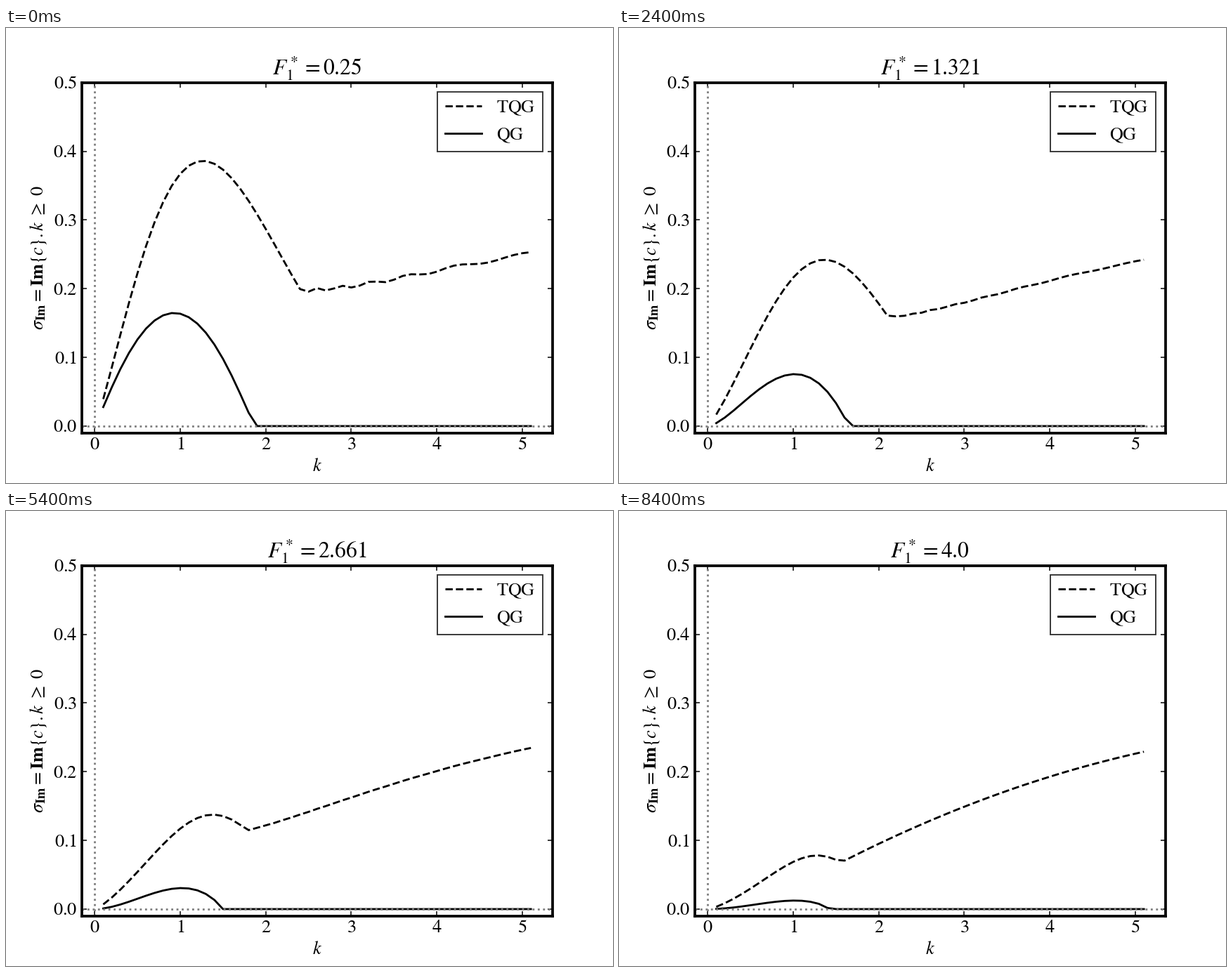
These frames come from a looping animation (864x648 px, 9000 ms). A matplotlib script:

```python
import matplotlib.pyplot as plt
import numpy as np
from matplotlib.animation import FuncAnimation

plt.rcParams.update({
    "font.family": "Liberation Serif",
    "mathtext.fontset": "stix",
    "font.size": 14,
    "axes.linewidth": 2,
})

FRAMES = 15
F_VALUES = np.linspace(0.25, 4, FRAMES)
K = np.arange(1, 52) / 10


def qg_growth(f):
    """Single unstable lobe that vanishes at a cutoff wavenumber."""
    peak = np.exp(-1.69 - 0.675 * f + 0.15 * np.exp(-4 * f))
    k_peak = 1.02 - 0.25 * np.exp(-4 * f)
    k_cut = 1.33 + 0.62 * np.exp(-f / 2)
    power = 2.15 - 1.2 * np.exp(-f / 1.6)
    width = k_cut - k_peak
    fall = np.maximum(k_cut - K, 0) / width
    return peak * (K / k_peak * fall ** (width / k_peak)) ** power


def tqg_hump(f):
    peak = np.exp(-0.86 - 0.4225 * f + 0.03 * np.exp(-3 * f))
    x = K / (1.39 - 0.033 * (f - 2.2) ** 2)
    m = 1.68 + 0.6 * f
    return peak * (x * np.exp((1 - x**m) / m)) ** (1.13 + 0.06 * f)


def tqg_tail(f):
    base = 0.083 + 0.055 * (K - 1.8) - 0.00512 * (K - 1.8) * (K - 3)
    lift = 0.236 * (2 - np.sqrt(f)) / K**1.7
    ripple = np.cos(2 * np.pi * (1 / K - 0.3846) / 0.0369)
    return base + lift + 0.0025 * np.exp(1.2 * (0.25 - f)) * ripple


def tqg_growth(f):
    """The faster of the low-k hump and the high-k branch."""
    hump = tqg_hump(f)
    return np.where(K < 1.35, hump, np.maximum(hump, tqg_tail(f)))


fig, ax = plt.subplots(figsize=(6.4, 4.8), dpi=135)
tqg, = ax.plot(K, tqg_growth(F_VALUES[0]), "k--", label=r"$\mathrm{TQG}$")
qg, = ax.plot(K, qg_growth(F_VALUES[0]), "k-", label=r"$\mathrm{QG}$")
ax.axhline(0, color="gray", ls=":")
ax.axvline(0, color="gray", ls=":")

ax.set_xlim(-0.15, 5.35)
ax.set_ylim(-0.01, 0.5)
ax.set_xticks(range(6), [f"${v}$" for v in range(6)])
ax.set_yticks(np.arange(6) / 10, [f"$0.{v}$" for v in range(6)])
ax.tick_params(direction="in", top=True, right=True)

ax.set_xlabel("$k$")
ax.set_ylabel(r"$\sigma_{\mathbf{Im}} = \mathbf{Im}\{c\}.k$ $\geq$ $0$")
title = ax.set_title("")
ax.legend(loc="upper right", fancybox=False, edgecolor="black")


def draw(n):
    f = F_VALUES[n]
    tqg.set_ydata(tqg_growth(f))
    qg.set_ydata(qg_growth(f))
    title.set_text(f"$F_1^* = {round(float(f), 3)}$")
    return tqg, qg, title


anim = FuncAnimation(fig, draw, frames=FRAMES, interval=600, repeat=True)
plt.show()
```
